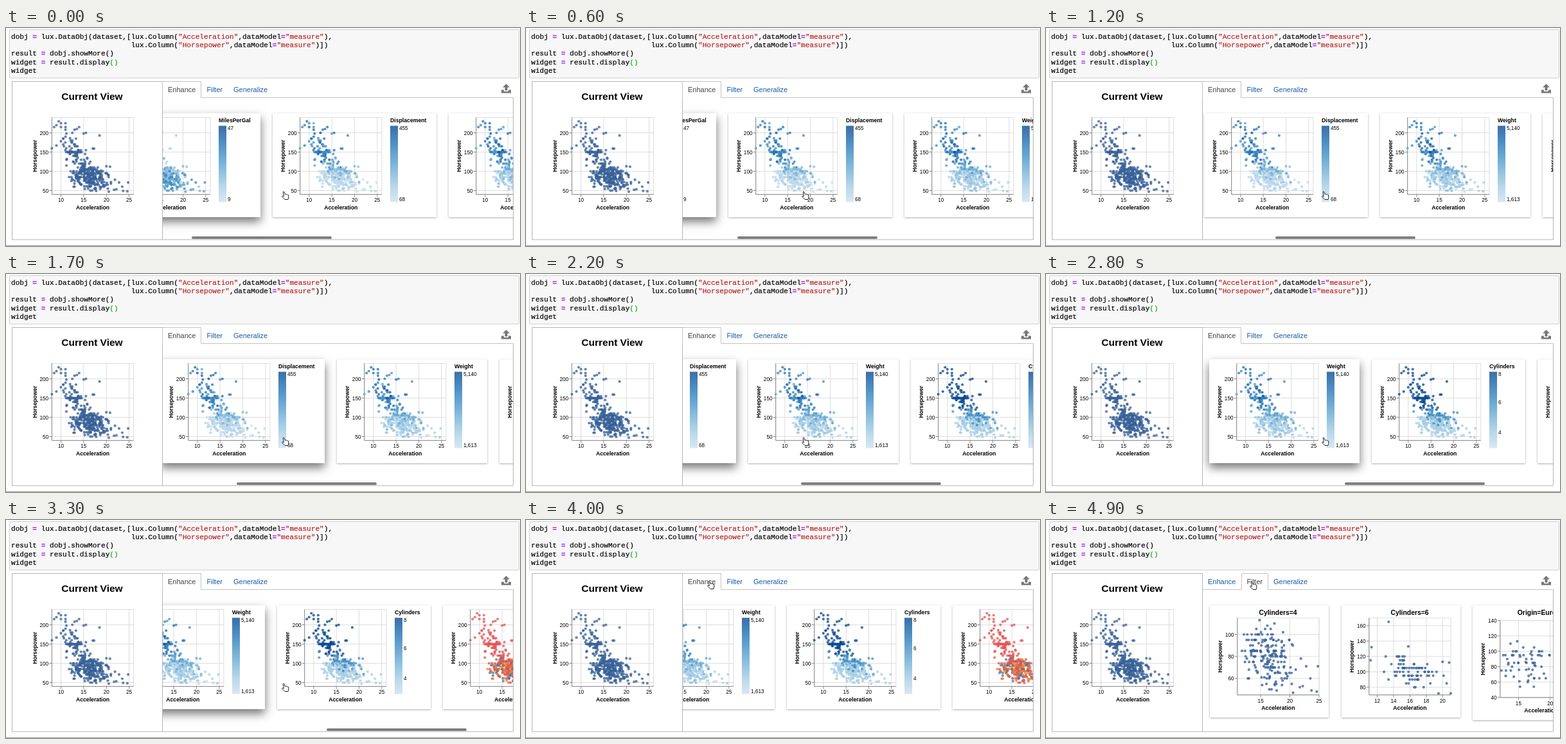
An HTML page that plays this animation: 800x340 px, repeating every 5 s.

```html
<!DOCTYPE html>
<html lang="en">
<head>
<meta charset="utf-8">
<title>Visualization recommendations</title>
<style>
  html, body { margin: 0; width: 100%; height: 100%; overflow: hidden; background: #fff; }
  #stage { position: relative; width: 800px; height: 340px; overflow: hidden; }
  svg { position: absolute; left: 0; top: 0; font-family: "Liberation Sans", Arial, sans-serif; }
  .code { font: 11.11px "Liberation Mono", monospace; white-space: pre; stroke-width: .2px; }
  .view { position: absolute; left: 244px; top: 109px; width: 545px; height: 220px; overflow: hidden; }
  .card { position: absolute; top: 24px; height: 162px; background: #fff; }
  .thumb { position: absolute; top: 215.5px; width: 218px; height: 4.5px; border-radius: 3px; background: #7f7f7f; }
  .tick { font-size: 8.2px; }
  .name { font-size: 8.7px; font-weight: bold; }
  .head { font-size: 10.4px; font-weight: bold; }
  .mid { text-anchor: middle; }
  .end { text-anchor: end; }
</style>
</head>
<body>
<div id="stage"></div>
<script>
const stage = document.getElementById('stage');
const LOOP = 5000, STEP = 100;
const clamp = (v, a, b) => Math.max(a, Math.min(b, v));

// ---- seeded car data ----
let seed = 20;
const rnd = () => (seed = (seed * 16807) % 2147483647) / 2147483647;
const norm = () => (rnd() + rnd() + rnd() + rnd() - 2) * 1.73;
const five = v => Math.round(v / 5) * 5;

const cars = [];
function addCar(acc, hp, cyl) {
  const big = (cyl - 4) / 2;
  const origin = cyl > 6 ? 2 : cyl > 4 ? (rnd() < .88 ? 2 : rnd() < .5 ? 0 : 1)
    : Math.floor(rnd() * 3);
  cars.push({
    acc, hp, cyl, origin,
    mpg: clamp(([29, 20, 15][big] + norm() * [5, 3, 2.5][big] - 9) / 38, 0, 1),
    disp: clamp(([110, 218, 345][big] + norm() * [22, 26, 45][big] - 68) / 387, 0, 1),
    weight: clamp(([2310, 3200, 4115][big] + norm() * [300, 300, 400][big] - 1613) / 3527, 0, 1),
    cylinders: (cyl - 3) / 5
  });
}

const strong = [
  9.5, 230, 10, 225, 11, 225, 9, 220, 8.5, 215, 10, 215, 11, 215, 11, 208, 14, 215, 13.5, 210,
  13, 208, 12.5, 200, 15, 198, 15.5, 200, 18.5, 193, 8, 160, 9, 167, 10, 178, 10.5, 170,
  11, 190, 12, 186, 12.5, 180, 13.3, 185, 11.2, 198, 17, 159, 17.3, 159
];
const slow = [
  24.8, 71, 24.6, 48, 23.7, 49, 23.5, 60, 22.2, 53, 21.9, 78, 22.8, 71, 21.7, 52, 20.5, 90, 21, 68
];
for (let i = 0; i < strong.length; i += 2) addCar(strong[i], strong[i + 1], 8);
for (let i = 0; i < slow.length; i += 2) addCar(slow[i], slow[i + 1], 4);
[[13.4, 165], [11.3, 132], [11.2, 115], [15.8, 133], [20.8, 112], [20, 113], [21, 72], [19.5, 72]]
  .forEach(p => addCar(p[0], p[1], 6));
for (let i = 0; i < 24; i++) addCar(11 + rnd() * 3.4, 150, 8);
for (let i = 0; i < 54; i++) {
  const a = clamp(13.2 + norm() * 1.5, 10.5, 18);
  addCar(a, clamp(five(150 - 9 * (a - 13) + norm() * 14), 105, 185), 8);
}
for (let i = 0; i < 76; i++) {
  const a = clamp(16.4 + norm() * 1.7, 12.8, 20.5);
  addCar(a, clamp(five(100 - 2 * (a - 16.3) + norm() * 9), 80, 125), 6);
}
for (let i = 0; i < 190; i++) {
  const a = clamp(16.4 + norm() * 2, 11.6, 21.5);
  const hp = clamp(79 - 3 * (a - 16.5) + norm() * 13, 47, 115);
  addCar(a, rnd() < .5 ? five(hp) : Math.round(hp), 4);
}
cars.map(c => [rnd(), c]).sort((a, b) => a[0] - b[0]).forEach((p, i) => cars[i] = p[1]);

// ---- colours ----
const BLUES = [[207, 225, 242], [168, 206, 229], [116, 178, 215], [69, 146, 198], [32, 111, 178], [10, 74, 144]];
const rgb = c => `rgb(${c.map(Math.round)})`;
function blues(v) {
  const p = v * (BLUES.length - 1), i = Math.min(Math.floor(p), BLUES.length - 2);
  return rgb(BLUES[i].map((c, k) => c + (BLUES[i + 1][k] - c) * (p - i)));
}
const PLAIN = () => '#376299';
const ORIGIN = ['#4c78a8', '#f58518', '#e45756'];

// ---- svg builders ----
const text = (x, y, s, cls, extra = '') => `<text x="${x}" y="${y}" class="${cls}" ${extra}>${s}</text>`;
const line = (x1, y1, x2, y2, color) => `<path d="M${x1} ${y1}L${x2} ${y2}" stroke="${color}"/>`;
const range = (a, b, d) => Array.from({ length: Math.floor((b - a) / d) + 1 }, (_, i) => a + i * d);

const W = 127.2, H = 120;
function plot(left, top, xd, yd, xt, yt, pts, color) {
  const X = v => left + (v - xd[0]) / (xd[1] - xd[0]) * W;
  const Y = v => top + H - (v - yd[0]) / (yd[1] - yd[0]) * H;
  const base = top + H;
  let s = `<rect x="${left}" y="${top}" width="${W}" height="${H}" fill="none" stroke="#ddd"/>`;
  for (const v of xt) s += line(X(v), top, X(v), base, '#ddd') + line(X(v), base, X(v), base + 4, '#888')
    + text(X(v), base + 11.8, v, 'tick mid');
  for (const v of yt) s += line(left, Y(v), left + W, Y(v), '#ddd') + line(left - 4, Y(v), left, Y(v), '#888')
    + text(left - 5.2, Y(v) + 3, v, 'tick end');
  s += line(left, top, left, base, '#888') + line(left, base, left + W, base, '#888');
  s += text(left + W / 2, base + 23.6, 'Acceleration', 'name mid');
  const ty = top + H / 2;
  s += text(left - 23.4, ty, 'Horsepower', 'name mid', `transform="rotate(-90 ${left - 23.4} ${ty})"`);
  for (const c of pts) {
    if (c.acc < xd[0] || c.acc > xd[1] || c.hp < yd[0] || c.hp > yd[1]) continue;
    s += `<circle cx="${X(c.acc).toFixed(1)}" cy="${Y(c.hp).toFixed(1)}" r="2.1" fill="${color(c)}" fill-opacity=".78"/>`;
  }
  return s;
}
const fullPlot = (left, color) =>
  plot(left, 139.5, [8, 26], [40, 240], range(10, 25, 5), range(50, 200, 50), cars, color);

const legend = (title, marks) => text(183, 147, title, 'name')
  + '<rect x="183" y="152.5" width="12" height="119" fill="url(#ramp)" opacity=".8"/>'
  + marks.map(m => text(197, m[1], m[0], 'tick')).join('');
const ends = (hi, lo) => [[hi, 159], [lo, 270]];

const svg = (w, h, y, body) => `<svg width="${w}" height="${h}" viewBox="0 ${y} ${w} ${h}">${body}</svg>`;
function add(parent, cls, html = '') {
  const el = document.createElement('div');
  el.className = cls;
  el.innerHTML = html;
  parent.appendChild(el);
  return el;
}
function addCard(parent, x, w, h, body) {
  const el = add(parent, 'card', svg(w, h, 133, body));
  Object.assign(el.style, { left: x + 'px', width: w + 'px', height: h + 'px', boxShadow: shadow(0) });
  return el;
}
function shadow(k) {
  return `0 ${1 + 6 * k}px ${3 + 11 * k}px rgba(0,0,0,${.32 + .23 * k})`;
}

// ---- static page ----
const code = [
  'dobj = lux.DataObj(dataset,[lux.Column("Acceleration",dataModel="measure"),',
  ' '.repeat(28) + 'lux.Column("Horsepower",dataModel="measure")])',
  'result = dobj.showMore()',
  'widget = result.display()',
  'widget'
].map((s, i) => {
  const painted = s.replace(/"[^"]*"|=/g, m => m === '='
    ? '<tspan fill="#a2f" stroke="#a2f" font-weight="bold">=</tspan>'
    : `<tspan fill="#ba2121" stroke="#ba2121">${m}</tspan>`)
    .replace('display()', 'display<tspan fill="#0b0" stroke="#0b0">()</tspan>');
  return text(8, 16.8 + i * 13.33, painted, 'code', 'stroke="#000"');
}).join('');

const stops = BLUES.map((c, i) => `<stop offset="${i / 5}" stop-color="${rgb(c)}"/>`).join('');
const EDGE = '#b4b4b4';
const tabPath = (a, b) => `M243.5 108.5H${a}V83.5H${b}V108.5H789.5`;
const page = `<defs><linearGradient id="ramp" x1="0" y1="1" x2="0" y2="0">${stops}</linearGradient></defs>
  <rect x="5.5" y="2.5" width="793" height="75.5" rx="1" fill="#f7f7f7" stroke="#cfcfcf"/>${code}
  ${line(0, 339.5, 800, 339.5, '#999')}
  <rect x="9.5" y="83.5" width="234" height="246.5" fill="none" stroke="${EDGE}"/>
  <path d="M789.5 108.5V330H243" fill="none" stroke="${EDGE}"/>
  <path id="tabs" fill="none" stroke="#c4c4c4"/>
  ${text(134, 112, 'Current View', 'mid', 'font-size="15.5" font-weight="bold"')}
  ${text(252, 100, 'Enhance', 'tab', 'font-size="11"')}
  ${text(312.5, 100, 'Filter', 'tab', 'font-size="11"')}
  ${text(354, 100, 'Generalize', 'tab', 'font-size="11"')}
  <path fill="#777" d="M778.5 87l5.5 5.5h-3.5v5h-4v-5h-3.5zM771 96.5h4v2.5h7v-2.5h4v5h-15z"/>
  ${fullPlot(71.4, PLAIN)}`;
stage.innerHTML = svg(800, 340, 0, page);

// ---- Enhance tab ----
const enhance = add(stage, 'view');
const by = key => c => blues(c[key]);
const deck = [
  [-267, 248, by('mpg'), legend('MilesPerGal', ends('47', '9'))],
  [0, 255, by('disp'), legend('Displacement', ends('455', '68'))],
  [274, 234, by('weight'), legend('Weight', ends('5,140', '1,613'))],
  [527, 239, by('cylinders'), legend('Cylinders', [['8', 159], ['6', 202.5], ['4', 250]])],
  [785, 270, c => ORIGIN[c.origin], '']
].map(([x, w, color, key]) => ({ x, el: addCard(enhance, 0, w, 162, fullPlot(42.7, color) + key) }));
const thumb = add(enhance, 'thumb');

// ---- Filter tab ----
const filter = add(stage, 'view');
const small = (x, h, title, top, xd, yd, xt, yt, pts) => addCard(filter, x, 185, h,
  text(106, 148, title, 'head mid') + plot(42.8, top, xd, yd, xt, yt, pts, PLAIN));
small(11, 175, 'Cylinders=4', 152.8, [11, 25], [45, 115], [15, 20, 25], [60, 80, 100], cars.filter(c => c.cyl === 4));
small(216, 175, 'Cylinders=6', 152.8, [11, 21], [70, 170], range(12, 20, 2), range(80, 160, 20), cars.filter(c => c.cyl === 6));
small(420, 179, 'Origin=Europe', 156.8, [12.1, 25], [40, 140], [15, 20, 25], range(40, 140, 20), cars.filter(c => c.origin === 0));

// ---- pointer ----
const hand = add(stage, '', svg(14, 16, 0, `<path fill="#fff" stroke="#222" stroke-width="1" stroke-linejoin="round"
  d="M3.2 1.5q1.2-1 2 .3l1 3.6 1.2-.4 1 .6 1.2-.2.8.9 1.2.2q.6 2.600 0 4.600l-.6 2.400H6L2.200 9.700q-1-1.500.2-1.900l2 1z"/>`)).firstChild;

// ---- motion ----
const SCROLL = [[0, 415], [600, 315], [800, 278], [1000, 246], [1500, 246], [1600, 245], [1700, 241], [1900, 176],
  [2200, 72], [2400, 18], [2600, -12], [2800, -20], [2900, -24], [3100, -62], [3300, -105], [3500, -121]];
const HAND_X = [[3600, 434], [3900, 287], [4200, 287], [4500, 322]];
const HAND_Y = [[3600, 261], [3900, 101], [4200, 101], [4500, 102]];
const FADE = [[3600, 1], [3900, 0]];
const HOVER = [
  [[1200, 1], [1400, 0]],
  [[1200, 0], [1400, 1], [2500, 1], [2700, 0]],
  [[2500, 0], [2700, 1], [3600, 1], [3800, 0]]
];
const TAB_SWITCH = 4500;

function at(keys, t) {
  if (t <= keys[0][0]) return keys[0][1];
  for (let i = 1; i < keys.length; i++) {
    const [t0, a] = keys[i - 1], [t1, b] = keys[i];
    if (t <= t1) return a + (b - a) * (t - t0) / (t1 - t0);
  }
  return keys[keys.length - 1][1];
}

const tabs = document.getElementById('tabs');
const labels = document.querySelectorAll('.tab');

function draw(t) {
  const pos = at(SCROLL, t), filtered = t >= TAB_SWITCH;
  deck.forEach((card, i) => {
    card.el.style.left = pos + card.x - 244 + 'px';
    const k = HOVER[i] ? at(HOVER[i], t) : 0;
    card.el.style.boxShadow = shadow(k);
  });
  thumb.style.left = 45 + (415 - pos) * .404 + 'px';
  thumb.style.opacity = at(FADE, t);
  enhance.style.display = filtered ? 'none' : '';
  filter.style.display = filtered ? '' : 'none';
  tabs.setAttribute('d', filtered ? tabPath(304.5, 345.5) : tabPath(243.5, 303.5));
  labels.forEach((el, i) => el.setAttribute('fill', i === +filtered ? '#444' : '#1a5aa8'));
  hand.style.left = at(HAND_X, t) - 6 + 'px';
  hand.style.top = at(HAND_Y, t) - 7 + 'px';
}

const start = performance.now();
function tick() {
  const t = (performance.now() - start) % LOOP;
  draw(Math.floor(t / STEP) * STEP);
  requestAnimationFrame(tick);
}
draw(0);
requestAnimationFrame(tick);
</script>
</body>
</html>
```
